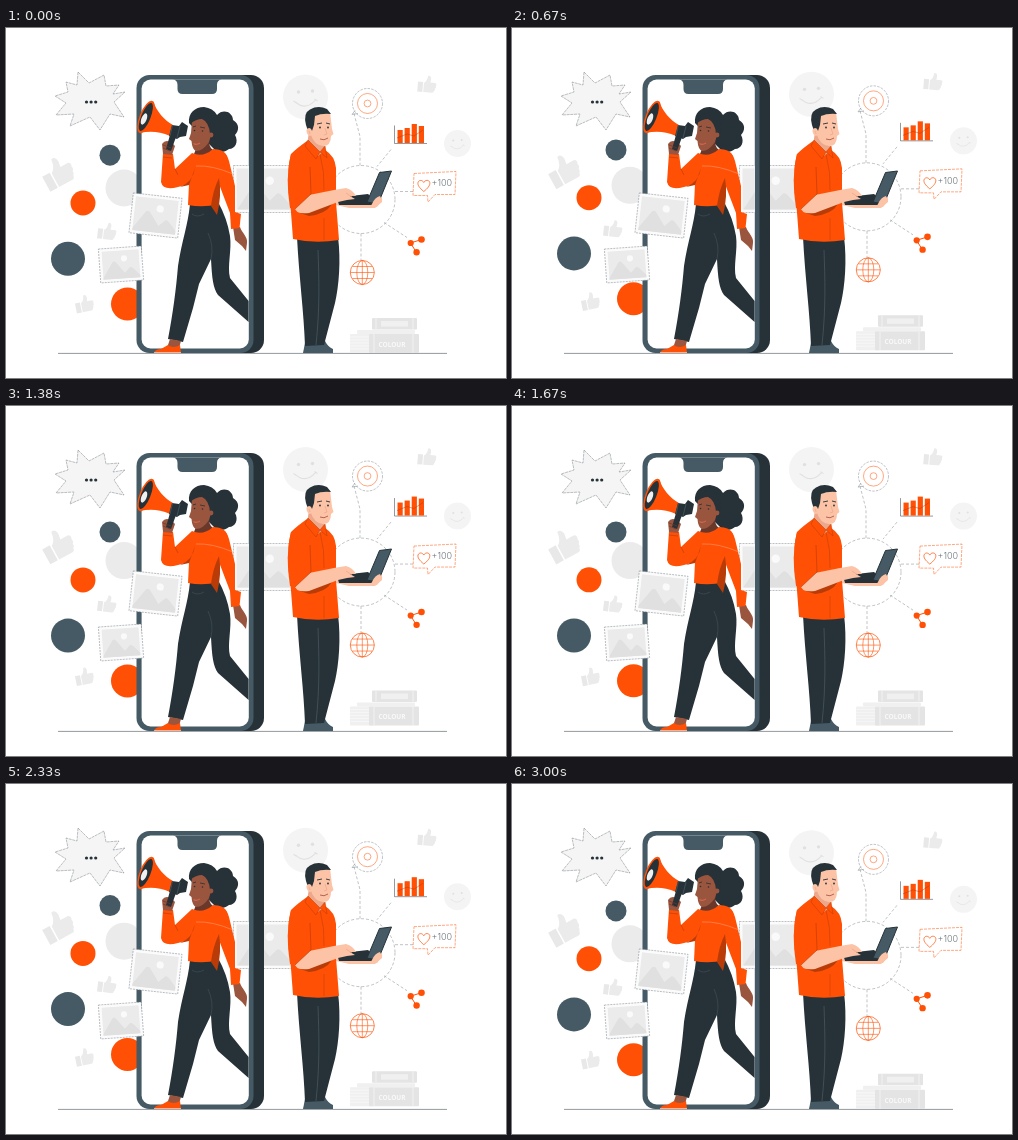
An HTML page with a canvas that plays this animation: 500 by 350 pixels, repeating every 3.04 s.

```html
<!DOCTYPE html>
<html lang="en">
<head>
<meta charset="utf-8">
<title>Social media</title>
<style>
html, body { margin: 0; width: 100%; height: 100%; overflow: hidden; background: #fff; }
canvas { display: block; width: 500px; height: 350px; }
</style>
</head>
<body>
<canvas id="stage"></canvas>
<script>
const LOOP = 3040;
const ORANGE = '#ff5005', FOLD = '#b93c08', DARK = '#263238', SLATE = '#455a64';
const SKIN = '#fcc3a6', PINK = '#eda78a', BROWN = '#9a553f', DEEP = '#6a382b';
const PALE = '#f5f5f5', MIST = '#ebebeb', GREY = '#e0e0e0';

const canvas = document.getElementById('stage');
const c = canvas.getContext('2d');
const ratio = window.devicePixelRatio || 1;
canvas.width = 500 * ratio;
canvas.height = 350 * ratio;

const paths = {};
function paint(path, fill, stroke, width = 0.6, dash = []) {
  if (fill) { c.fillStyle = fill; c.fill(path); }
  if (stroke) {
    c.strokeStyle = stroke;
    c.lineWidth = width;
    c.setLineDash(dash);
    c.stroke(path);
  }
}
function shape(d, fill, stroke, width, dash) {
  paint(paths[d] || (paths[d] = new Path2D(d)), fill, stroke, width, dash);
}
function oval(x, y, rx, ry, turn, fill, stroke, width, dash) {
  const p = new Path2D();
  p.ellipse(x, y, rx, ry, turn, 0, Math.PI * 2);
  paint(p, fill, stroke, width, dash);
}
const disc = (x, y, r, fill, stroke, width, dash) => oval(x, y, r, r, 0, fill, stroke, width, dash);
function box(x, y, w, h, r, fill, stroke, width, dash) {
  const p = new Path2D();
  p.roundRect(x, y, w, h, r);
  paint(p, fill, stroke, width, dash);
}
const line = (d, color, width, dash) => shape(d, null, color, width, dash);
function at(x, y, turn, size, draw) {
  c.save();
  c.translate(x, y);
  c.rotate(turn);
  c.scale(size, size);
  draw();
  c.restore();
}
// Linear rise and fall, 0 to 1 and back
const wave = u => 1 - Math.abs(1 - 2 * (u % 1));

function smiley(x, y, r) {
  at(x, y, 0, r / 22.5, () => {
    disc(0, 0, 22.5, '#f4f4f4');
    disc(-7, -5, 1.7, GREY);
    disc(7, -6, 1.7, GREY);
    line('M-10 5Q0 14 10 3M-12 4L-9 6M9 2L12 4', GREY, 1.1);
  });
}

function thumb(x, y, size, turn) {
  at(x, y, turn, size, () => {
    shape('M-10 -3L-4.5 -3L-4.5 8L-10 8Z', '#e8e8e8');
    shape('M-3.5 -2Q0 -4 .5 -10Q3.5 -11 4 -7L3.4 -3L9 -3Q11 -2 9.8 .3Q10.5 2 9 3.3Q9.4 5 8 6Q8 8 6 8L-3.5 8Z', MIST);
  });
}

function photo(w, h) {
  box(-w / 2, -h / 2, w, h, 0, '#fbfbfb', '#78828a', 0.5, [2, 1]);
  c.save();
  c.beginPath();
  c.rect(-w / 2 + 3, -h / 2 + 3, w - 6, h - 6);
  c.clip();
  c.fillStyle = MIST;
  c.fillRect(-w / 2, -h / 2, w, h);
  const s = h / 40;
  c.scale(s, s);
  disc(4, -7, 3.6, '#fafafa');
  shape('M-24 18L-10 -3Q-8 -5 -6 -3L4 10L10 4Q12 3 14 5L26 18Z', GREY);
  c.restore();
}

function burst() {
  shape('M72 44L83 55L98 47L100 58L113 57L107 66L119 64L108 74L118 89L104 86L94 102L84 89L64 98L68 86L50 87L60 75L49 68L62 64L60 54L71 57Z',
    PALE, '#59646a', 0.4, [3, 0.7]);
  for (let i = 0; i < 3; i++) disc(80.5 + i * 4.6, 74, 1.6, DARK);
}

function books() {
  box(344, 306, 24, 19, 1, '#f0f0f0');
  for (let y = 309; y < 324; y += 3) line(`M344 ${y}H363`, '#fafafa', 0.7);
  box(363, 306, 50, 19, 1, '#e4e4e4');
  line('M368 306V325M407 306V325', PALE, 0.8);
  c.fillStyle = '#f9f9f9';
  c.font = '600 6.5px "Noto Sans", sans-serif';
  c.textAlign = 'center';
  c.textBaseline = 'middle';
  c.fillText('COLOUR', 386, 316.8);
  box(351, 302, 58, 4, 1, '#f0f0f0');
  box(366, 290, 45, 11.5, 1, '#e4e4e4');
  box(375, 293, 27, 5.5, 0, '#f0f0f0');
  line('M370 290V301M407 290V301', PALE, 0.8);
}

function network() {
  const dash = [3, 2], ink = '#7d878d';
  disc(355, 171, 34, null, ink, 0.5, dash);
  line('M348 85L354 108V137M385 121L371 138M389 163H407M378 194L401 209M355 205V232', ink, 0.5, dash);

  disc(361.5, 75, 15, '#fff', ink, 0.5, [2.5, 1.2]);
  disc(361.5, 75, 10, null, ORANGE, 0.5);
  disc(361.5, 75, 3.4, null, ORANGE, 0.5);
  line('M349 82L346 86L352 85', ink, 0.5);

  line('M388.5 97V115H421', DARK, 0.5);
  [13, 15, 19, 17].forEach((h, i) => box(391.5 + i * 7.1, 114.5 - h, 5.2, h, 0, ORANGE));
  line('M391 109.5L401 105.5L408 107.5L417 101.5', FOLD, 0.5);

  shape('M408 145L450 143L449 166H429L422 173.5L421.5 167H407Z', '#fff', ORANGE, 0.5, [3, 1]);
  line('M417.8 163C413 159 411.5 156.5 412 154C413 151 416.5 151.5 417.8 154C419 151.3 423 151 423.8 154C424.3 157 421.5 160 417.8 163Z', ORANGE, 0.7);
  c.fillStyle = '#6c757a';
  c.font = '300 9px Inter, sans-serif';
  c.textAlign = 'left';
  c.textBaseline = 'middle';
  c.fillText('+100', 425.5, 155.3);

  line('M415.5 211L404.5 214.5L410.5 224', ORANGE, 1);
  disc(415.5, 211, 3.3, ORANGE);
  disc(404.7, 214.5, 3.1, ORANGE);
  disc(410.6, 223.8, 3.2, ORANGE);

  disc(356.3, 244, 12, '#fff', ORANGE, 0.7);
  oval(356.3, 244, 5.5, 12, 0, null, ORANGE, 0.6);
  line('M356.3 232V256M344.3 244H368.3M346.5 238H366M346.5 250H366', ORANGE, 0.6);
}

function phone() {
  box(138, 47, 120, 278, 13, DARK);
  box(130.5, 47, 117, 278, 13, SLATE);
  c.save();
  c.beginPath();
  c.roundRect(135.6, 51.6, 107.2, 268.8, 9);
  c.clip();
  c.fillStyle = '#fff';
  c.fillRect(130, 47, 120, 280);
  farPhoto();
  c.restore();
  shape('M167 51.5Q171.5 52 171.5 57V61Q171.5 66 176.5 66H206Q211 66 211 61V57Q211 52 215.5 51.5Z', SLATE);
}
// Seen both through the screen and beside the phone
const farPhoto = () => at(259, 161, 0, 1, () => photo(63, 47));

function woman() {
  // Legs
  shape('M184 176C182 197 176 212 172 238C170 262 167 285 162 311L177 314L187 280L193 256L205 231C206 250 207 260 212 267L242.6 294V273L224 250C221 238 226 222 224 208Q221 190 212 174Z', DARK);
  line('M205 231Q208 218 202 205M186 186Q191 190 198 186', '#44535b', 0.6);
  shape('M164 311L175 313L173 320L161 320Z', BROWN);
  shape('M162 317Q167 321 174 317L175 325H148Q149 321 155 321Z', ORANGE);
  line('M148 324.6H175', '#fff', 0.6);

  // Lowered arm
  shape('M227 199L234 199C236 205 242 209 241 215L240 223L236 218L229 212Z', BROWN);
  shape('M212 122Q221 124 223 133L229 158L229 184L235 186L233.5 200L225 201L224 185Q219 172 213 156Z', ORANGE);

  // Hair behind the face
  shape('M183 95C182 85 189 79 198 79Q207 80 211 87C217 80 227 84 227 92C234 96 233 103 229 107C233 114 229 121 223 121C217 126 210 124 207 120L199 112Z', DARK);
  shape('M192 116L204 106Q201 119 208 123L199 132L188 126Z', DEEP);
  shape('M186 93Q193 87 202 90L206 104L203 114Q197 123 190 123Q186 121 185.5 113L183 111L185 105Z', BROWN);
  shape('M184 96Q188 87 196 84L208 88L209 104L204 106Q203 94 196 91Q190 91 184 96Z', DARK);
  disc(205, 107, 2.4, BROWN);
  line('M187 99L190 98M194 99L199 100', DARK, 0.8);
  disc(188.5, 102.5, 0.8, DARK);
  disc(196.5, 103, 0.8, DARK);
  line('M187.5 115.5Q190 117.5 194 115', '#d5634b', 1.2);

  // Torso and raised arm
  shape('M186 125Q197 130 207 121Q218 121 221 128L215 151L212 176Q198 180 182 177L183 156L172 159Q157 163 155 154L157 125L167 126L169 141Z', ORANGE);
  shape('M189 140Q187 154 174 159L183 157Z', FOLD);
  shape('M213 150Q207 162 205 178L211 187Q216 168 213 150Z', FOLD);
  line('M190 138Q206 137 227 146', '#ff9a70', 0.6);
  line('M169 141L172 147M157 129L166 130', FOLD, 0.6);
  shape('M157 126L156 116Q159 111 165 114L169 118L166 127Z', BROWN);

  // Megaphone
  shape('M147 73C151 84 158 92 167 97L164 108C153 103 143 103 134 105Z', ORANGE);
  oval(140, 89, 6.4, 17.3, 0.38, ORANGE);
  oval(139.8, 89, 4.7, 15, 0.38, DARK);
  oval(138, 91, 2.6, 6, 0.38, '#f0f0f0');
  shape('M166 97L173 98L176 94L182 98L180 108L174 109L171 111L163 108Z', DARK);
  shape('M164 107L170 109L165 123L160 121Z', DARK);
  line('M166.5 97L164 108M174 98L171 110', SLATE, 0.8);
  line('M157 117L165 120M157 120L164 123', DEEP, 0.7);
}

function man() {
  // Legs and shoes
  shape('M299 315L311 316L313 325H297Z', SLATE);
  shape('M311 315L319 313Q322 319 327 321V325H311Z', SLATE);
  shape('M291 209H332C335 232 333 258 329 275L318 317L299 318C298 285 293 249 291 209Z', DARK);
  line('M312 222C313 250 314 280 310 317', '#4d5b62', 0.7);

  // Far arm and laptop
  shape('M331 171L356 172L371 169Q377 167 376 174L369 180L343 180L330 177Z', SKIN);
  shape('M331 169.5L362 166L372 175L370 177H333Z', DARK);
  shape('M373.5 144.5L385.5 143L372 176L361 174Z', SLATE, DARK, 1);
  shape('M366 176Q369 169 374 168L376 172L371 179H364Z', SKIN);

  // Shirt
  shape('M301 113Q291 120 285 126Q281 140 283 158L287 211Q309 216 333 212L330 174V140Q329 128 319 122Z', ORANGE);
  shape('M303 104L317 112L319 123L312 128L301 117Z', PINK);
  shape('M302 112L299 118L310 131L314 124Z', ORANGE, FOLD, 0.5);
  shape('M319 118L314 124L321 130Z', ORANGE, FOLD, 0.5);
  line('M314 126Q319 145 318 162M318 190V212', FOLD, 0.5);
  shape('M294 185L326 176Q320 186 303 188Z', FOLD);

  // Near arm
  shape('M289 174L303 167L328 162L340 160Q347 162 350 168L344 168L349 171L341 172L332 174L303 185Q289 187 288 178Z', SKIN);
  line('M340 165L346 169', PINK, 0.7);
  shape('M285 126Q279 150 284 180L289 181L305 166L304 139Z', ORANGE);
  line('M304 139L305 166L289 181', FOLD, 0.6);

  // Head
  shape('M303 89L324 84L326 101L327.5 106L325 108Q325 118 317 118Q308 117 305 107Z', SKIN);
  shape('M300 97Q297 85 304 81.5Q312 77 321 81L325 86Q316 85 309 88L308 97L306 103L302 103Z', DARK);
  oval(303.5, 104, 2.8, 4, -0.3, SKIN);
  line('M303 103Q304 105 304 106', PINK, 0.7);
  line('M311 96L316 95M320 95L324 96', DARK, 0.9);
  disc(314, 99.5, 0.9, DARK);
  disc(322, 99.5, 0.9, DARK);
  line('M319 100L321 106L318 107', PINK, 0.7);
  line('M314 111Q318 113 322 110', '#a14c3b', 0.8);
}

function draw(t) {
  const slow = -6 * wave(t / LOOP);
  const quick = -6 * wave(t / (LOOP / 2));
  c.setTransform(ratio, 0, 0, ratio, 0, 0);
  c.fillStyle = '#fff';
  c.fillRect(0, 0, 500, 350);

  line('M52 325.4H441', DARK, 0.5);
  at(0, slow, 0, 1, () => {
    smiley(299.5, 69, 22.5);
    smiley(451.5, 115.5, 13.5);
    thumb(421, 57, 0.92, 0.08);
    thumb(52, 145.5, 1.55, -0.5);
    thumb(101, 204, 0.92, 0.12);
    thumb(78.5, 276.5, 0.92, -0.2);
    disc(118, 160, 18.5, MIST);
    books();
  });
  at(0, slow + 0.5, 0, 1, network);
  at(0, quick, 0, 1, () => {
    disc(104, 127.2, 10.5, SLATE);
    disc(77, 175, 12.5, ORANGE);
    disc(62, 230.7, 17, SLATE);
    disc(121.5, 276, 16.5, ORANGE);
  });
  burst();
  farPhoto();
  phone();
  woman();
  at(149.5, 187.5, 0.11, 1, () => photo(49, 40));
  at(115, 236.5, -0.07, 1, () => photo(43, 34));
  man();
}

function tick() {
  draw(performance.now() % LOOP);
  requestAnimationFrame(tick);
}
tick();
</script>
</body>
</html>
```
